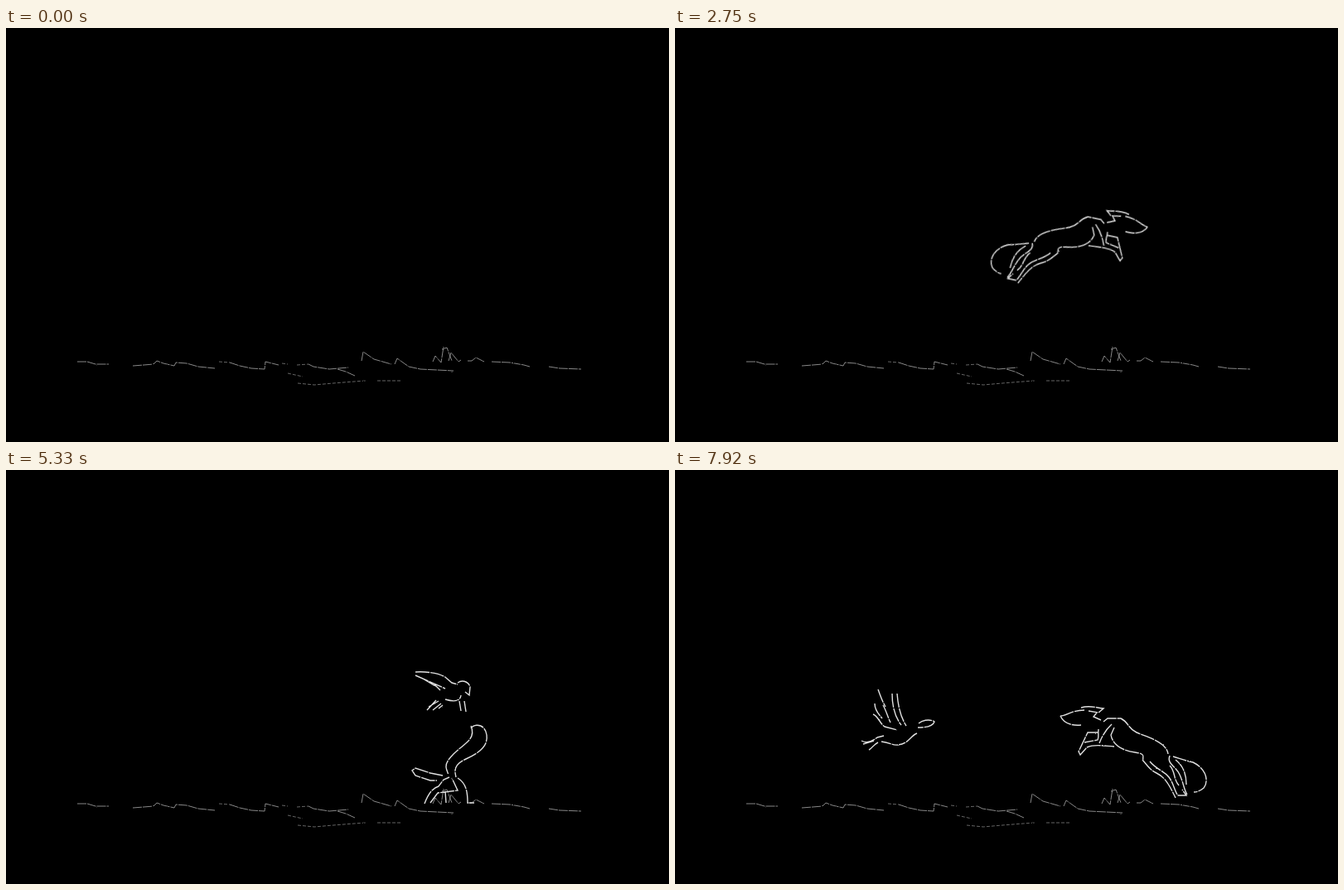
Animation, 800 px wide and 500 px high, one loop 8000 ms. Source, as an HTML page:

```html
<!DOCTYPE html>
<html lang="en">
<head>
<meta charset="utf-8">
<title>Fox and bird</title>
<style>
html, body { margin: 0; width: 100%; height: 100%; overflow: hidden; background: #000; }
svg { display: block; width: 100vw; height: 100vh; }
path { fill: none; stroke: #e0e0e0; stroke-width: 1.4; stroke-dasharray: 17 1; vector-effect: non-scaling-stroke; }
#ground path { stroke: #a0a0a0; stroke-width: .85; stroke-dasharray: 11 1; }
#ground .faint { stroke: #777; stroke-dasharray: 4 2; }
</style>
</head>
<body>
<svg viewBox="0 0 800 500">
  <defs>
    <filter id="chalk" filterUnits="userSpaceOnUse" x="0" y="0" width="800" height="500" color-interpolation-filters="sRGB">
      <feTurbulence type="fractalNoise" baseFrequency=".35" numOctaves="2" seed="4"/>
      <feDisplacementMap in="SourceGraphic" scale="1.5" xChannelSelector="R" yChannelSelector="G"/>
    </filter>
    <clipPath id="above"><path d="M0 0H800V405H0Z"/></clipPath>
  </defs>
  <g filter="url(#chalk)">
    <g id="ground">
      <path d="M86 403L98 403 108 406 124 406M153 408L166 407 178 406 182 402 190 405 203 408 205 404 218 405 232 409 252 411
        M270 404L282 408 296 411 312 412 313 403 329 407M365 406L371 409 390 412 413 410M400 412L410 415 421 420"/>
      <path class="faint" d="M257 403L270 404M333 405L340 406M351 407L365 406M340 417L358 421
        M352 429L372 431 395 429 420 427 434 426M448 426L478 426"/>
      <path d="M429 402L431 391 444 400 465 406M469 406L472 399 486 409 500 412 540 414M515 403L518 396 525 404 528 385
        M526 388L532 386 538 402M534 402L537 392 546 403 549 401M557 402L562 402 567 398 577 403M586 403L608 404 625 407 632 409M655 409L668 411 694 412"/>
    </g>
    <g id="fox" clip-path="url(#above)"></g>
    <g id="tail"></g>
    <g id="bird"></g>
  </g>
</svg>
<script>
// Each pose: anchor point, then its line work in stage coordinates.
const poses = {
  walk: ['175 404', `M50 337C62 327 80 322 158 324M50 337C75 338 95 345 118 347S150 342 160 337
    M162 328C172 318 182 317 190 321S215 327 223 324M163 325C170 319 180 318 188 318M228 323L237 318
    M236 308L250 304M240 318L247 306 258 303M254 314L260 307M264 314L270 309
    M247 297C247 283 252 272 259 268L265 286M266 282L274 268 276 284
    M264 287C272 283 283 286 288 293L300 299 297 309 278 310
    M274 317C277 325 272 331 275 338M247 331C251 340 253 348 248 353M271 335L270 349
    M219 362L228 398M220 363L229 358M248 353L237 372 237 399M246 364L250 376 272 374M262 352L258 364
    M248 366L262 362 281 367 279 384 275 385 272 375M184 369C195 366 207 369 217 371
    M149 342L143 361M139 362L128 375 123 398M131 399L142 376 163 369M172 361L185 348
    M177 369L165 378 177 390 183 392M180 371L180 382 187 391`],
  sit: ['370 401', `M299 331C294 338 294 346 303 353S325 365 334 366 346 373 350 378
    M298 336C283 344 281 356 293 371S318 388 353 389M351 375C352 356 358 342 366 336S378 330 384 328
    M387 331C392 321 400 317 411 316M394 312L414 317M410 305C411 294 416 288 422 286L426 304
    M426 300L431 302 443 294 438 304M424 306C430 306 436 310 440 320L450 332 445 338 428 334 408 326
    M408 326L414 331M412 332L416 352M418 334L417 342M410 345L400 358 395 362 393 397
    M406 362L411 371 400 380 405 398 392 398M366 365C380 362 388 370 386 378S378 388 376 388
    M360 378L374 398 394 402 398 399M374 388L388 396 400 392`],
  leap: ['553 341', `M465 297C469 306 478 309 490 308M465 297C473 297 478 290 494 290M490 287C500 284 508 287 517 288L511 293 499 291
    M509 293L505 298 514 302M517 304L522 300 538 300C548 305 546 312 557 317S593 328 595 343
    M527 307C518 315 514 325 512 330M530 311L526 320C528 332 540 339 555 341S563 347 565 350
    M511 313C510 319 512 322 510 326L494 329M510 317L498 317 487 340 489 344 497 335C506 331 516 333 530 334
    M564 350C571 358 573 362 581 366S594 375 604 396M573 352C581 362 590 363 596 371S603 389 607 393L617 393 612 386
    M597 345C593 355 604 357 609 368S614 386 618 392M597 357C604 364 601 373 608 381
    M601 346C608 348 616 351 625 353C640 360 645 375 638 384Q632 389 626 389M604 350C613 357 617 367 617 380`],
  peek: ['545 402', `M508 361L497 359 499 377C495 383 490 385 487 387L498 390 504 381M508 366L516 359M502 375L513 369
    M512 379L524 380C530 378 534 374 537 366M511 360C516 356 519 351 524 348M509 371C514 368 518 360 525 355M525 349L530 347M534 350L542 358
    M538 354C546 336 560 338 578 330S590 310 597 297M602 296L602 317C602 335 590 350 570 352L545 350
    M542 361C550 366 551 378 551 401M524 388L522 402`],
  dig: ['540 403', `M527 369L512 366 494 360 490 363 494 369 512 375 520 375
    M505 403C510 390 515 384 522 382L528 374 535 371M545 372C555 378 557 388 557 402L565 402
    M512 402L521 390 545 387 538 372M530 388L531 402`],
  plume: ['540 371', `M561 312C565 306 578 306 580 320S570 342 555 349 541 362 543 371
    M561 309C568 325 553 330 540 343S531 360 534 368`],
  hang: ['540 402', `M491 277L499 283 512 281M510 280L519 279 528 283M506 286L510 294 519 294 523 291
    M512 285L524 290M528 289L541 285M523 291L520 302 530 309 541 305
    M541 285C556 283 558 297 556 312S561 340 575 348M573 347L576 340 584 338 588 348 593 343 592 352
    M592 354L600 368 582 371 558 357 548 363M533 308C533 325 536 335 536 352
    M514 361L530 359 535 346 545 344C548 350 541 356 538 357L528 363 514 363M536 358L542 391M546 365L545 394`],
  rope: ['540 285', `M531 180C526 205 530 235 536 250L539 285M533 180C541 205 549 225 548 250L547 273`],
  swoop: ['768 190', `M739 172C745 173 750 178 757 182M744 170L755 177M750 170L757 176M758 169L762 175M764 169L769 175
    M797 163L790 164 781 167C777 172 774 177 765 183M761 184C752 190 756 195 752 203L748 210 752 209M774 179L764 188
    M755 203L752 213 758 206M758 205C764 202 765 196 772 195M783 181L790 181M791 186L793 191M774 195C783 197 787 201 793 206`],
  hover: ['527 268', `M494 244C510 243 525 246 531 251L538 257 545 259M494 248L530 264M503 252L520 262M517 259L524 266
    M545 257C550 253 558 255 560 262L559 272 554 268M530 277C540 280 548 280 549 272
    M522 279L510 286M525 282L515 290M527 284L522 288M519 278L508 290M547 279L549 291M553 279L555 292`],
  grip: ['530 175', `M514 115C513 130 515 142 523 152M504 125C507 140 512 148 521 154M503 135L507 145 517 153
    M506 154L520 156M514 163L522 159M538 115C546 125 542 140 536 150M549 126C551 138 546 146 539 152
    M553 140L549 148 541 154M551 154L540 156M547 163L538 159M524 156C528 152 534 155 533 162L530 175 525 166Z
    M535 174L550 184M539 179L549 191M541 186L547 196`],
  fly: ['269 302', `M245 265C248 273 250 279 254 286M251 284C255 291 257 299 260 305M262 270C262 284 265 298 273 308
    M268 270C269 284 272 298 279 309M241 282C241 290 245 294 250 300M239 295C245 297 247 306 253 310L268 314
    M294 306C300 301 309 301 313 304C311 310 302 311 293 311
    M292 318C284 321 282 331 269 332C262 333 260 329 249 328M225 327C232 331 239 327 244 323L252 321
    M227 331L240 327M234 338C238 336 239 332 245 329`]
};

// Keys: tick, pose, x, y, scale x, scale y, turn.
const tracks = {
  fox: [
    [0], [2, 'walk', -85, 399], [5, 'walk', 95, 393], [7, 'walk', 166, 404], [10, 'walk', 175, 404],
    [15, 'walk', 206, 404], [17, 'walk', 241, 404, 1, .65], [19, 'walk', 276, 404, .93, .65], [21, 'walk', 324, 404, .98, .56],
    [23, 'sit', 356, 401, 1.3, 1.14], [25, 'sit', 366, 401, 1.1, 1.05], [26, 'sit', 370, 401], [28, 'sit', 355, 401, 1, .85],
    [30, 'leap', 400, 325, -1, 1, -15], [33, 'leap', 475, 265, -1, 1, 12], [35, 'leap', 535, 320, -1, 1, 65],
    [36, 'dig', 540, 403], [41, 'peek', 545, 402], [51, 'peek', 545, 402], [53, 'peek', 545, 402, 1, 1.15], [55, 'peek', 545, 402],
    [58, 'dig', 540, 403], [74, 'hang', 540, 402, 1, .9], [77, 'hang', 540, 402],
    [82, 'leap', 548, 325, 1, 1, 15], [84, 'leap', 552, 347], [85, 'sit', 538, 401, -1], [90, 'sit', 533, 401, -1],
    [92, 'sit', 548, 401, -1, .85], [94, 'leap', 560, 347], [95, 'leap', 553, 341]
  ],
  tail: [
    [0], [36, 'plume', 540, 371], [37, 'plume', 540, 371], [39, 'plume', 540, 371, 1, 1.7], [41],
    [58, 'plume', 540, 371, 1, 1.4], [60, 'plume', 540, 371, -1, 1.2], [62, 'plume', 540, 371, 1, 1.3],
    [64, 'plume', 540, 371], [70, 'plume', 540, 371], [73, 'plume', 540, 371, .5, 2],
    [74, 'rope', 540, 295, 1, 1.1], [77, 'rope', 540, 285], [81, 'rope', 540, 285, 1, 1.1], [82]
  ],
  bird: [
    [0], [41, 'swoop', 768, 190], [46, 'swoop', 520, 330], [47, 'hover', 476, 380, .7, .9], [51, 'hover', 480, 377, .75, .9],
    [55, 'hover', 478, 380, .7, .9], [58, 'hover', 478, 370, .9], [62, 'hover', 525, 288], [64, 'hover', 527, 268],
    [67, 'hover', 535, 208], [69, 'hover', 555, 270], [70, 'grip', 568, 306], [73, 'grip', 554, 242],
    [74, 'grip', 530, 175], [77, 'grip', 530, 175], [81, 'grip', 530, 164], [83, 'grip', 510, 164],
    [84, 'fly', 430, 141, -1], [85, 'fly', 360, 152, -1], [87, 'fly', 308, 219, -1], [90, 'fly', 248, 235, -1],
    [92, 'fly', 247, 302], [94, 'fly', 260, 304], [95, 'fly', 269, 302]
  ]
};

// Runs of ticks on which a new drawing appears; between them the picture holds.
const runs = [[0, 0], [2, 5], [7, 7], [10, 10], [15, 15], [17, 17], [19, 19], [21, 21], [23, 23], [25, 26], [28, 37],
  [39, 39], [41, 47], [51, 51], [53, 55], [58, 62], [64, 85], [87, 87], [90, 90], [92, 92], [94, 95]];

const hold = tick => {
  const [, end] = runs.findLast(([start]) => start <= tick);
  return Math.min(tick, end);
};

function draw(id, tick) {
  const keys = tracks[id];
  const i = keys.findLastIndex(key => key[0] <= tick);
  const [start, pose, ...from] = keys[i];
  const next = keys[i + 1];
  let markup = '';
  if (pose) {
    const same = next && next[1] === pose;
    const part = same ? (tick - start) / (next[0] - start) : 0;
    const rest = [0, 0, 1, 1, 0];
    const [x, y, sx, sy, turn] = rest.map((base, n) => {
      const a = from[n] ?? base;
      return same ? a + ((next[n + 2] ?? base) - a) * part : a;
    });
    const [anchor, d] = poses[pose];
    const back = anchor.split(' ').map(v => -v);
    markup = `<path d="${d}" transform="translate(${x} ${y}) rotate(${turn}) scale(${sx} ${sy}) translate(${back})"/>`;
  }
  document.getElementById(id).innerHTML = markup;
}

let shown = -1;
function render() {
  const tick = hold(Math.floor(performance.now() % 8000 * .012 + .05));
  if (tick !== shown) {
    shown = tick;
    for (const id in tracks) draw(id, tick);
  }
  requestAnimationFrame(render);
}
render();
</script>
</body>
</html>
```
